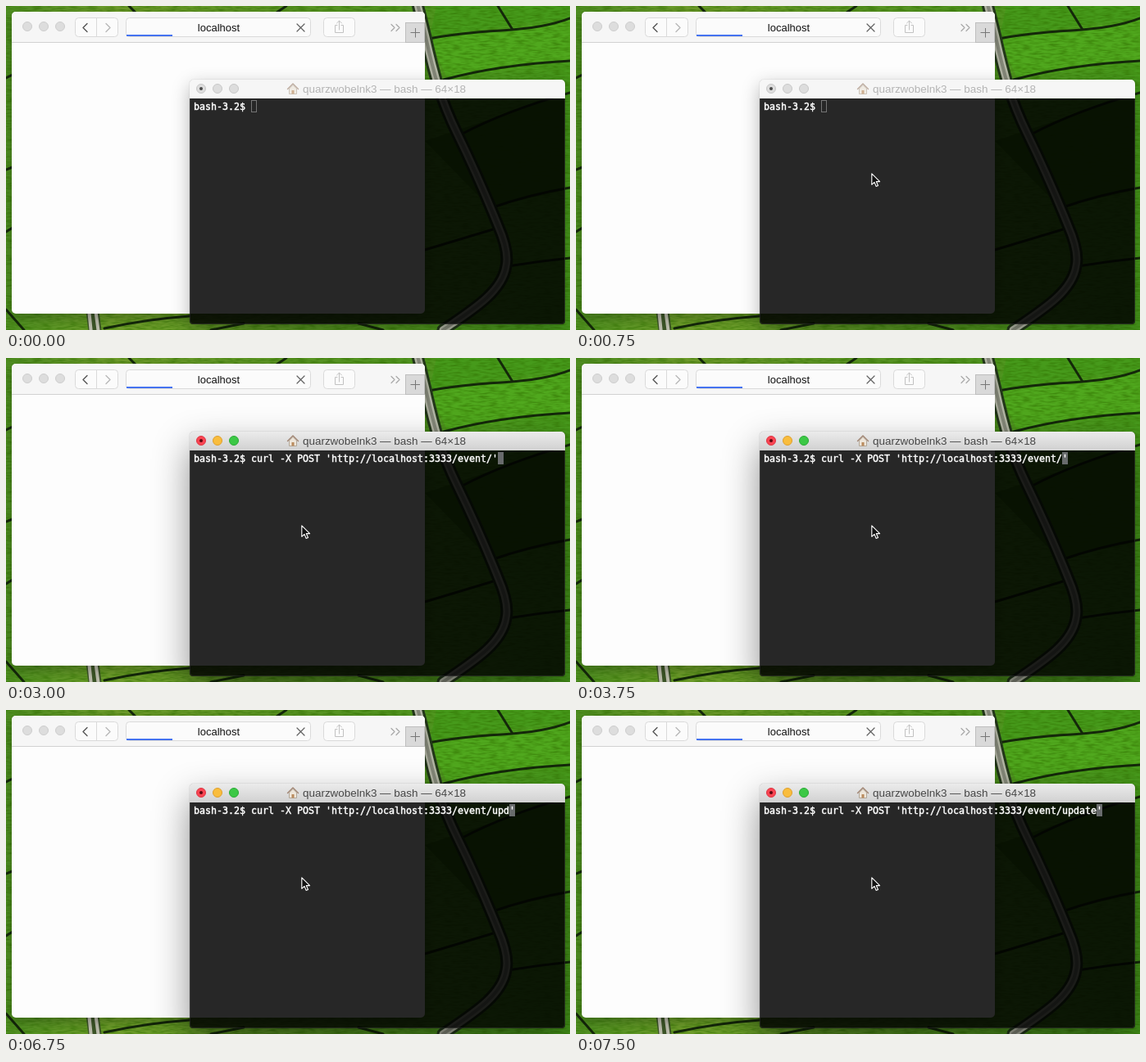
Write an HTML page that moves like this. It is 688 px wide and 396 px high and loops after 8000 ms.

```html
<!DOCTYPE html>
<html lang="en">
<head>
<meta charset="utf-8">
<title>Terminal over browser</title>
<style>
  html, body { margin: 0; width: 100%; height: 100%; overflow: hidden; background: #47911c; }
  #stage { position: relative; width: 688px; height: 396px; overflow: hidden; }
  #stage > * { position: absolute; }
  svg { left: 0; top: 0; display: block; }
  .shadow { border-radius: 5px; }
  #siteShadow { left: 7px; top: 7px; width: 504px; height: 369px; box-shadow: 0 5px 14px rgba(0,0,0,.28); }
  #termShadow { left: 224px; top: 90px; width: 458px; height: 299px; }
  #termShadow.idle { box-shadow: 0 0 1px rgba(0,0,0,.4), 0 7px 22px rgba(0,0,0,.28); }
  #termShadow.active { box-shadow: 0 0 1px rgba(0,0,0,.5), 0 18px 44px rgba(0,0,0,.43); }
  .ui { font-family: "Liberation Sans", Arial, sans-serif; }
  .mono { font: 11.63px "DejaVu Sans Mono", monospace; white-space: pre; }
  .line { fill: none; stroke-linecap: round; stroke-linejoin: round; }
</style>
</head>
<body>
<div id="stage">
  <svg width="688" height="396" viewBox="0 0 688 396">
    <defs>
      <linearGradient id="grass" x2="1">
        <stop offset="0" stop-color="#4f8f22"/>
        <stop offset=".2" stop-color="#6f9d2b"/>
        <stop offset=".5" stop-color="#5b9624"/>
        <stop offset="1" stop-color="#479a1c"/>
      </linearGradient>
      <filter id="grain" x="0" y="0" width="1" height="1">
        <feTurbulence type="fractalNoise" baseFrequency=".09 .45" numOctaves="2" seed="4"/>
        <feColorMatrix values="0 0 0 0 .03  0 0 0 0 .16  0 0 0 0 0  2.2 0 0 0 -.85"/>
      </filter>
    </defs>
    <rect width="688" height="396" fill="url(#grass)"/>
    <path d="M525 0H688V13L517 38Z" fill="#469a1b"/>
    <path d="M517 41L688 17V66L538 88Z" fill="#50a81e"/>
    <path d="M511 165L682 108V225L590 246Z" fill="#35780f"/>
    <rect width="688" height="396" filter="url(#grain)" opacity=".6"/>
    <g class="line" stroke="#14280a" stroke-width="3">
      <path d="M0 88L8 84M0 200L8 197M0 276L8 271M0 371L22 396M150 0L158 8M330 8L342 0"/>
      <path d="M511 41Q550 33 604 30T688 15M600 0L618 29M534 90Q600 72 688 67"/>
      <path d="M555 157Q610 128 688 106M591 247Q640 230 688 222M511 298L604 270M612 318Q650 312 688 308"/>
      <path d="M120 394Q170 383 224 379M250 396L290 388M430 388L460 396"/>
    </g>
    <g class="line">
      <path d="M501 -6Q507 17 512 38C522 84 531 116 550 155S588 238 600 268Q614 300 610 318C605 350 568 372 533 396" stroke="#23381a" stroke-width="15"/>
      <path d="M501 -6Q507 17 512 38C522 84 531 116 550 155S588 238 600 268Q614 300 610 318C605 350 568 372 533 396" stroke="#b4b7a6" stroke-width="9"/>
      <path d="M501 -6Q507 17 512 38C522 84 531 116 550 155S588 238 600 268Q614 300 610 318C605 350 568 372 533 396" stroke="#85897a" stroke-width="4"/>
      <path d="M105 370L109 400" stroke="#3b5426" stroke-width="16"/>
      <path d="M101 370L104 400M109 370L113 400" stroke="#bbbcac" stroke-width="4"/>
    </g>
  </svg>
  <div id="siteShadow" class="shadow"></div>
  <svg width="688" height="396" viewBox="0 0 688 396">
    <rect x="7" y="7" width="504" height="369" rx="5" fill="#fdfdfd"/>
    <path d="M7 44V12a5 5 0 0 1 5-5H506a5 5 0 0 1 5 5V44Z" fill="#f6f6f6"/>
    <path d="M7 44.5H511" stroke="#d2d2d2"/>
    <g fill="#dddddd" stroke="#cecece">
      <circle cx="26" cy="25" r="5.5"/><circle cx="46" cy="25" r="5.5"/><circle cx="66" cy="25" r="5.5"/>
    </g>
    <g fill="#fbfbfb" stroke="#dadada">
      <rect x="84.5" y="14.5" width="52" height="23" rx="4"/>
      <path d="M110.5 15V37"/>
      <rect x="146.5" y="14.5" width="225" height="23" rx="4"/>
      <rect x="387.5" y="14.5" width="38" height="23" rx="4"/>
    </g>
    <g class="line" stroke-width="1.4">
      <path d="M99 21.5L94 26.5L99 31.5" stroke="#555"/>
      <path d="M122 21.5L127 26.5L122 31.5" stroke="#b8b8b8"/>
      <path d="M355 22L364 31M364 22L355 31" stroke="#606060" stroke-width="1.2"/>
      <path d="M404 23.5H401.5V32.5H411.5V23.5H409M406.5 29V18.5M403.5 21L406.5 18L409.5 21" stroke="#c2c2c2" stroke-width="1"/>
      <path d="M470 22.5L474 26.5L470 30.5M476 22.5L480 26.5L476 30.5" stroke="#a8a8a8" stroke-width="1.2"/>
    </g>
    <path d="M147 36H203" stroke="#4573f0" stroke-width="2"/>
    <text class="ui" x="259.5" y="31" font-size="13" text-anchor="middle" fill="#111">localhost</text>
    <rect x="487.5" y="20.5" width="23" height="24" fill="#d9d9d9" stroke="#bebebe"/>
    <path d="M493.5 32.5H505M499.5 27V38.5" stroke="#777"/>
  </svg>
  <div id="termShadow" class="shadow"></div>
  <svg width="688" height="396" viewBox="0 0 688 396">
    <defs>
      <linearGradient id="bar" x2="0" y2="1">
        <stop offset="0" stop-color="#ebebeb"/><stop offset="1" stop-color="#d1d1d1"/>
      </linearGradient>
    </defs>
    <path d="M224 112H682V385a4 4 0 0 1 -4 4H228a4 4 0 0 1 -4 -4Z" fill="#000" fill-opacity=".846"/>
    <path d="M224.5 113V385a3.5 3.5 0 0 0 3.5 3.5H678a3.5 3.5 0 0 0 3.5 -3.5V113" fill="none" stroke="#fff" stroke-opacity=".1"/>
    <path id="titleBar" d="M224 113V95a5 5 0 0 1 5-5H677a5 5 0 0 1 5 5V113Z"/>
    <g id="lights">
      <circle cx="238" cy="101" r="5.5"/><circle cx="258" cy="101" r="5.5"/><circle cx="278" cy="101" r="5.5"/>
    </g>
    <circle id="dot" cx="238" cy="101" r="2"/>
    <g id="house">
      <path d="M345.5 101L350 96.5L354.5 101V107.5H345.5Z" fill="#eee6da" stroke="#a89a88" stroke-width=".8"/>
      <path d="M343.5 101.5L350 95L356.5 101.5" class="line" stroke="#a08572" stroke-width="1.4"/>
      <path d="M348.5 103H351.5V107.5H348.5Z" fill="#b98a5c"/>
    </g>
    <text id="title" class="ui" x="362" y="106" font-size="13.45">quarzwobelnk3 — bash — 64×18</text>
    <rect id="caret" y="115"/>
    <text id="shell" class="mono" x="229" y="127" fill="#fff" stroke="#fff" stroke-width=".45"></text>
    <path id="mouse" d="M0 0V13.5L3.2 10.6L5.4 15.7L7.7 14.7L5.5 9.8H9.8Z" fill="#111" stroke="#fff" stroke-width="1.1" stroke-linejoin="round"/>
  </svg>
</div>
<script>
  const LOOP = 8000, CELL = 7, LEFT = 229;
  const PROMPT = "bash-3.2$ ";
  const COMMAND = "curl -X POST 'http://localhost:3333/event/";
  const WORD = "update";
  // time at which each letter of WORD appears
  const KEYS = [6250, 6500, 6750, 7000, 7000, 7250];
  const $ = id => document.getElementById(id);
  const set = (el, attrs) => {
    for (const name in attrs) el.setAttribute(name, attrs[name]);
  };
  const lights = [...$("lights").children];

  function drawWindow(active) {
    $("termShadow").className = "shadow " + (active ? "active" : "idle");
    set($("titleBar"), { fill: active ? "url(#bar)" : "#f6f6f6" });
    set($("title"), { fill: active ? "#464646" : "#b4b4b4" });
    set($("house"), { opacity: active ? 1 : .65 });
    set($("dot"), { fill: active ? "#5c0710" : "#4a4a4a" });
    const fills = active ? ["#fb4552", "#f9bd3d", "#3cc846"] : Array(3).fill("#dddddd");
    const rims = active ? ["#dd3543", "#dea02f", "#2aab35"] : Array(3).fill("#c8c8c8");
    lights.forEach((el, i) => set(el, { fill: fills[i], stroke: rims[i] }));
  }

  function drawShell(t, active) {
    const typed = WORD.slice(0, KEYS.filter(k => t >= k).length);
    const line = t < 3000 ? PROMPT : PROMPT + COMMAND + typed + "'";
    const column = line.length - (t >= 3750 ? 1 : 0);
    const x = LEFT + column * CELL;
    $("shell").textContent = line;
    set($("caret"), active
      ? { x, y: 115, width: 7, height: 15, fill: "#686b6c", stroke: "none" }
      : { x: x + .5, y: 115.5, width: 6, height: 14, fill: "none", stroke: "#747474" });
  }

  function draw(t) {
    const active = t >= 1250;
    drawWindow(active);
    drawShell(t, active);
    set($("mouse"), {
      visibility: t < 500 ? "hidden" : "visible",
      transform: t < 750 ? "translate(352.5 38.5)" : "translate(360.8 204.8)"
    });
  }

  function tick() {
    draw(performance.now() % LOOP);
    requestAnimationFrame(tick);
  }
  tick();
</script>
</body>
</html>
```
